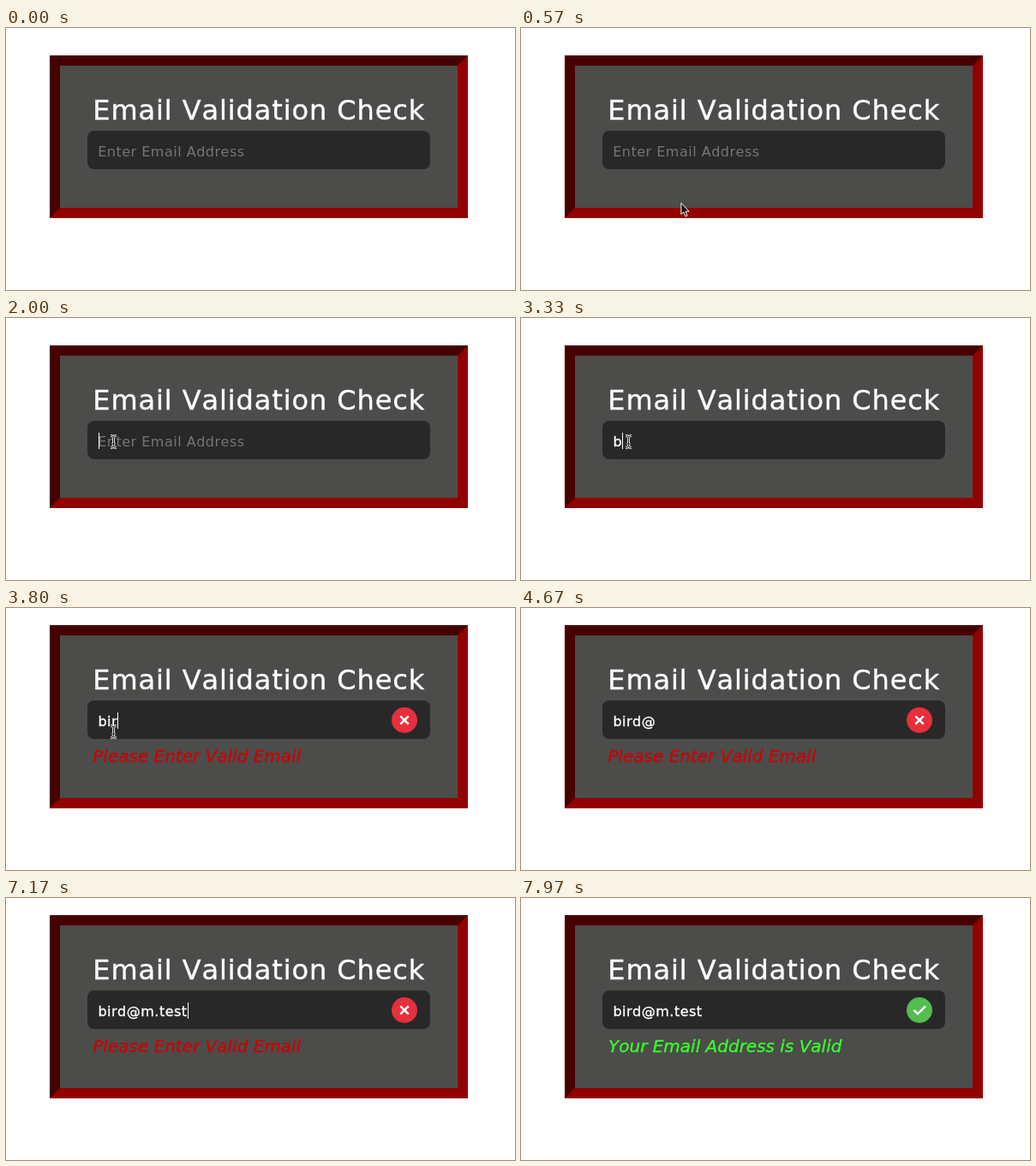
An HTML page that plays this animation: 594x306 px, repeating every 8 s.

```html
<!DOCTYPE html>
<html lang="en">
<head>
<meta charset="utf-8">
<title>Email Validation Check</title>
<style>
  html, body { margin: 0; width: 100%; height: 100%; overflow: hidden; background: #fff; }
  svg { display: block; }
  text { font-family: Verdana, "DejaVu Sans", sans-serif; font-kerning: none; fill: #fff; white-space: pre; }
  .title { font-size: 32px; letter-spacing: .9px; stroke: #fff; stroke-width: .4; }
  .field { font-size: 16px; letter-spacing: .5px; }
  .hint { fill: #757575; }
  .typed { stroke: #fff; stroke-width: .35; }
  .msg { font-size: 20px; font-style: italic; stroke-width: .35; }
  .error { fill: #c80505; stroke: #c80505; }
  .ok { fill: #38ff2c; stroke: #38ff2c; }
  .mark { fill: none; stroke: #fff; stroke-width: 2.5; }
</style>
</head>
<body>
<svg width="594" height="306" viewBox="0 0 594 306">
  <rect width="594" height="306" fill="#fff"/>
  <rect id="frame" x="51" width="488" fill="#470000"/>
  <path id="lit" fill="#920000"/>
  <rect id="panel" x="63" width="464" fill="#4c4c4a"/>
  <g id="content">
    <text class="title" x="101.3" y="107">Email Validation Check</text>
    <rect x="95" y="120" width="400" height="45" rx="8" fill="#282828"/>
    <text id="hint" class="field hint" x="107.2" y="150">Enter Email Address</text>
    <text id="value" class="field typed" x="107.4" y="150"></text>
    <rect id="caret" y="134" width="1" height="19" fill="#fff"/>
    <g id="bad">
      <circle cx="465" cy="143" r="15" fill="#e6303c"/>
      <path class="mark" d="M460.3 138.3l9.4 9.4M469.7 138.3l-9.4 9.4"/>
      <text class="msg error" x="101.3" y="192">Please Enter Valid Email</text>
    </g>
    <g id="good">
      <circle cx="465" cy="143" r="15" fill="#55bc50"/>
      <path class="mark" d="M458.5 143l4.5 4.3 9-9"/>
      <text class="msg ok" x="102" y="192">Your Email Address is Valid</text>
    </g>
  </g>
  <path id="arrow" d="M0 0V13.2L3 10.6L5 15.6L7.2 14.7L5.2 9.8H9.2Z" fill="#111" stroke="#fff"/>
  <g id="beam" fill="none">
    <path id="beamEdge" stroke="#dcdcdc" stroke-width="3"/>
    <path id="beamCore" stroke="#222" stroke-width="1"/>
  </g>
</svg>
<script>
  const LOOP = 8000, BLINK = 520;
  const EMAIL = "bird@m.test";
  const KEYS = [3330, 3530, 3730, 3930, 4130, 5400, 5770, 6370, 6670, 6830, 7170];
  const FOCUS = 1830, INVALID = 3430, VALID = 7260, HIDE = 4100;
  // time, x, y of the pointer
  const PATH = [[30, 594, 262], [570, 187, 204.5], [1670, 125.5, 144.5]];

  const $ = id => document.getElementById(id);
  const show = (id, on) => $(id).setAttribute("visibility", on ? "visible" : "hidden");
  const place = (id, x, y) => $(id).setAttribute("transform", `translate(${x} ${y})`);
  const span = (id, top, bottom) => {
    $(id).setAttribute("y", top);
    $(id).setAttribute("height", bottom - top);
  };

  const beam = "M-3.5-7Q0-7 0-4.5V4.5Q0 7-3.5 7M3.5-7Q0-7 0-4.5M0 4.5Q0 7 3.5 7M-2 2.5H2";
  $("beamEdge").setAttribute("d", beam);
  $("beamCore").setAttribute("d", beam);

  function pointer(t) {
    const i = PATH.findIndex(p => p[0] > t);
    if (i < 0) return PATH[PATH.length - 1].slice(1);
    if (i === 0) return PATH[0].slice(1);
    const a = PATH[i - 1], b = PATH[i];
    const u = (t - a[0]) / (b[0] - a[0]);
    const e = 1 - (1 - u) ** 2;
    return [a[1] + (b[1] - a[1]) * e, a[2] + (b[2] - a[2]) * e];
  }

  function drawBox(open) {
    const top = open ? 20 : 32, bottom = open ? 234 : 222;
    span("frame", top, bottom);
    span("panel", top + 12, bottom - 12);
    $("lit").setAttribute("d", `M539 ${top}V${bottom}H51L63 ${bottom - 12}H527V${top + 12}Z`);
    place("content", 0, open ? -12 : 0);
  }

  function render(t) {
    const typed = KEYS.filter(k => k <= t).length;
    drawBox(t >= INVALID);
    show("hint", !typed);
    show("bad", t >= INVALID && t < VALID);
    show("good", t >= VALID);

    const value = $("value");
    value.textContent = EMAIL.slice(0, typed);
    const width = typed ? value.getComputedTextLength() : 0;
    const since = t - (typed ? KEYS[typed - 1] : FOCUS);
    $("caret").setAttribute("x", Math.round(108 + Math.max(0, width - .6)));
    show("caret", since >= 0 && since % (2 * BLINK) < BLINK);

    const [x, y] = pointer(t);
    const visible = t >= 30 && t < HIDE;
    const inField = y < 165;
    show("arrow", visible && !inField);
    show("beam", visible && inField);
    place("arrow", x, y);
    place("beam", x, y);
  }

  const start = performance.now();
  function tick() {
    render((performance.now() - start) % LOOP);
    requestAnimationFrame(tick);
  }
  tick();
</script>
</body>
</html>
```
